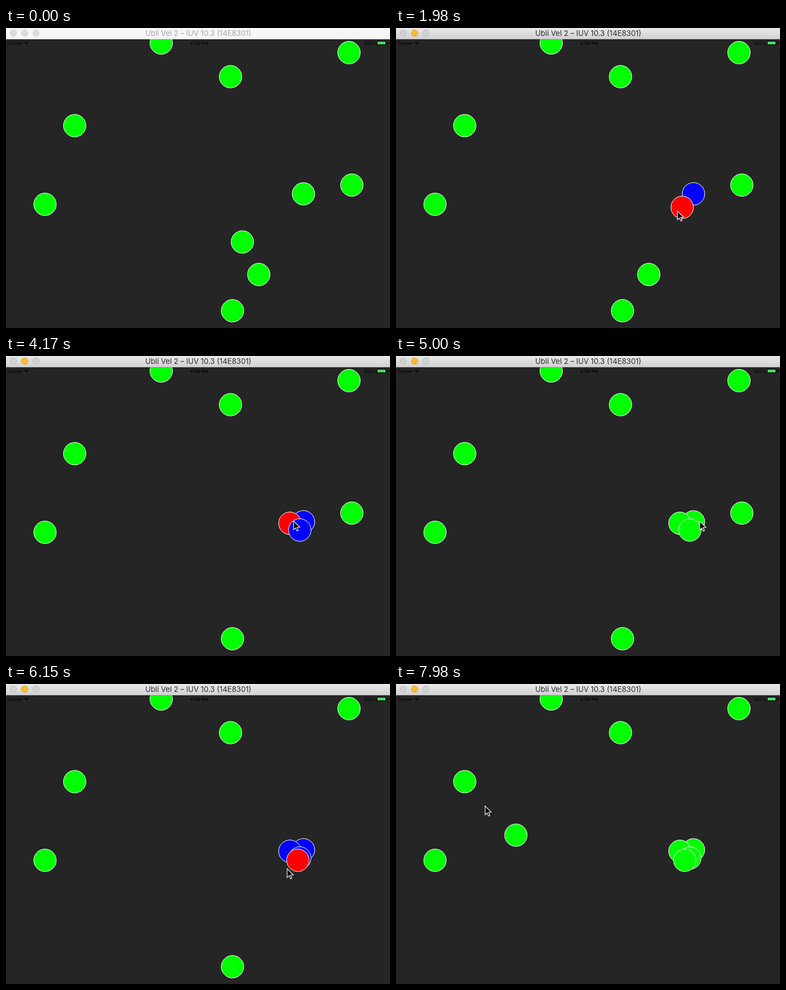
Animation of 679x530 px, one loop 8000 ms. Source, as an HTML page with a canvas:

```html
<!DOCTYPE html>
<html lang="en">
<head>
<meta charset="utf-8">
<title>Drag and collide</title>
<style>
  html, body { margin: 0; width: 100%; height: 100%; overflow: hidden; background: #252525; }
  canvas { display: block; }
</style>
</head>
<body>
<canvas id="stage" width="679" height="530"></canvas>
<script>
const ctx = document.getElementById('stage').getContext('2d');
const W = 679, H = 530, BAR = 20, LOOP = 8000, STEP = 60, R = 20;
const ENTER = 420, FOCUS = 1080;
const FONT = 'Inter, Roboto, sans-serif';

const easeIn = u => u * u;
const easeOut = u => u * (2 - u);
const easeBoth = u => u * u * (3 - 2 * u);

// Balls in stacking order; dragged ones follow the pointer from grab to drop.
const balls = [
  { x: 274.5, y: 26.5 },
  { x: 606.5, y: 43.5 },
  { x: 397, y: 86 },
  { x: 121.5, y: 172.5 },
  { x: 69, y: 311.5 },
  { x: 526, y: 293 },
  { x: 400.5, y: 499.5, grab: 7390, drop: 7821 },
  { x: 447, y: 435.5, grab: 3530, drop: 4770 },
  { x: 418, y: 378, grab: 1130, drop: 2730 },
  { x: 611.5, y: 277.5, grab: 5230, drop: 6630 }
];

// Each pointer move starts where the one before it ended.
const moves = [];
let spot = { x: 212, y: 510 };
function move(start, end, x, y, ease = easeBoth) {
  moves.push({ start, end, from: spot, to: { x, y }, ease });
  spot = { x, y };
}
move(ENTER, 900, 409, 384, easeOut);
move(1430, 2130, 510.5, 313.5);
move(2730, 3240, 460, 441);
move(3240, 3480, 453, 431);
move(3530, 4170, 508, 291);
move(4770, 5230, 592, 292);
move(5290, 5570, 558, 324.5, easeIn);
move(5570, 6330, 491, 326, easeOut);
move(6630, 7030, 391, 484);
move(7030, 7210, 386.5, 498);
move(7390, 7980, 157, 215);

const current = t => moves.findLast(m => t >= m.start) || moves[0];

// The screen refreshes in even steps while the pointer moves.
function snap(t) {
  const { start, end } = current(t);
  return t < start || t >= end ? t : start + Math.floor((t - start) / STEP) * STEP;
}

function pointer(t) {
  const { start, end, from, to, ease } = current(t);
  const k = ease(Math.max(0, Math.min(1, (t - start) / (end - start))));
  return { x: from.x + (to.x - from.x) * k, y: from.y + (to.y - from.y) * k };
}

function place(ball, t) {
  if (!ball.grab || t < ball.grab) return { x: ball.x, y: ball.y, held: false };
  const a = pointer(ball.grab), b = pointer(Math.min(t, ball.drop - 0.01));
  return { x: ball.x + b.x - a.x, y: ball.y + b.y - a.y, held: t < ball.drop };
}

function disc(x, y, r, fill, line) {
  ctx.beginPath();
  ctx.arc(x, y, r, 0, Math.PI * 2);
  ctx.fillStyle = fill;
  ctx.fill();
  ctx.strokeStyle = line;
  ctx.lineWidth = 1;
  ctx.stroke();
}

function box(x, y, w, h, color) {
  ctx.fillStyle = color;
  ctx.fillRect(x, y, w, h);
}

function label(text, x, y, size, color, align) {
  ctx.font = size + 'px ' + FONT;
  ctx.fillStyle = color;
  ctx.textAlign = align;
  ctx.fillText(text, x, y);
}

function drawBalls(t) {
  const spots = balls.map(b => place(b, t));
  const held = spots.find(s => s.held);
  for (const s of spots) {
    const hit = held && Math.hypot(s.x - held.x, s.y - held.y) < 2 * R;
    disc(s.x, s.y, R - 0.1, s.held ? '#f00' : hit ? '#00f' : '#0f0', '#fff');
  }
}

function drawStatus() {
  label('Carrier', 3, 30, 8, '#000', 'left');
  label('4:56 PM', 341.5, 30, 8.2, '#000', 'center');
  label('100%', 654, 30, 8, '#000', 'right');
  ctx.strokeStyle = '#000';
  ctx.lineWidth = 1.1;
  for (const r of [0.6, 2.6, 5]) {
    ctx.beginPath();
    ctx.arc(36.5, 29.5, r, -Math.PI * 0.76, -Math.PI * 0.24);
    ctx.stroke();
  }
  box(656, 23, 16, 7, '#000');
  box(672.5, 25, 1, 3, '#000');
  box(675, 26, 3, 1.5, '#000');
  box(657, 24, 14, 5, '#4cd964');
}

function drawTitleBar(active) {
  const shade = ctx.createLinearGradient(0, 0, 0, BAR);
  shade.addColorStop(0, active ? '#e8e8e8' : '#f6f6f6');
  shade.addColorStop(1, active ? '#d1d1d1' : '#f6f6f6');
  box(0, 0, W, BAR, shade);
  box(0, BAR - 1, W, 1, active ? '#b4b4b4' : '#dcdcdc');
  for (let i = 0; i < 3; i++) {
    const lit = active && i === 1;
    disc(13 + 20 * i, 9, 5.7, lit ? '#fdbd2e' : active ? '#d2d2d2' : '#dcdcdc',
      lit ? '#dfa023' : active ? '#bcbcbc' : '#d3d3d3');
  }
  label('Ubli Vel 2 – lUV 10.3 (14E8301)', 340, 14, 13.1,
    active ? '#2c2c2c' : '#a9a9a9', 'center');
}

function drawPointer({ x, y }) {
  ctx.save();
  ctx.translate(x + 0.5, y + 0.5);
  const arrow = new Path2D('M0 0V15.5L3.6 12.2L6 17.6L8.4 16.6L6 11.3L11 11Z');
  ctx.fillStyle = '#000';
  ctx.fill(arrow);
  ctx.strokeStyle = '#fff';
  ctx.lineWidth = 1.1;
  ctx.stroke(arrow);
  ctx.restore();
}

function draw(time) {
  const t = snap(time % LOOP);
  box(0, 0, W, H, '#252525');
  drawBalls(t);
  drawStatus();
  drawTitleBar(t >= FOCUS);
  if (t >= ENTER) drawPointer(pointer(t));
}

let begin;
function tick(now) {
  begin ??= now;
  draw(now - begin);
  requestAnimationFrame(tick);
}
draw(0);
requestAnimationFrame(tick);
</script>
</body>
</html>
```
